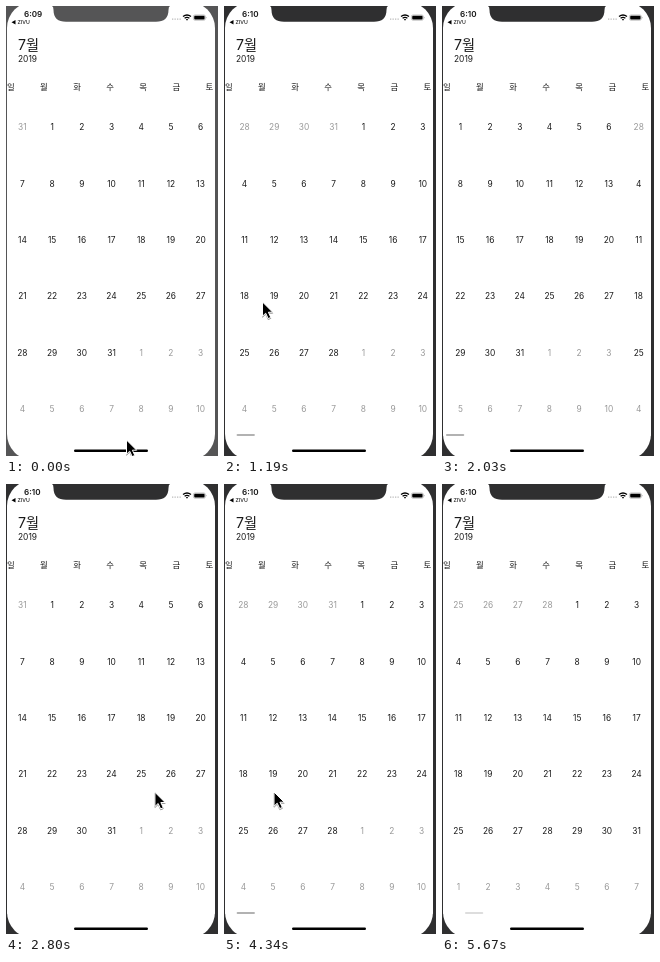
These frames come from a looping animation (212x450 px, 5740 ms). An HTML page:

```html
<!DOCTYPE html>
<html lang="ko">
<head>
<meta charset="utf-8">
<style>
html, body { margin: 0; width: 100%; height: 100%; overflow: hidden; }
svg { display: block; width: 212px; height: 450px; }
text { font-family: Inter, "Noto Sans CJK KR", "Noto Sans CJK", sans-serif; font-size: 8.4px; fill: #1a1a1a; }
.mid { text-anchor: middle; }
.dim { fill: #999; }
#arrow { filter: drop-shadow(.5px 1px .7px #0006); }
</style>
</head>
<body>
<svg viewBox="0 0 212 450">
  <defs><clipPath id="screen"><rect x="1" y="100" width="208" height="350"/></clipPath></defs>
  <rect class="bezel" width="212" height="450"/>
  <rect x="1" y="-4" width="208" height="458" rx="26" fill="#fff"/>
  <path class="bezel" d="M46 0Q47.5 .6 47.5 4C47.5 12 52 15.8 60 15.8H150C158 15.8 162.5 12 162.5 4Q162.5 .6 164 0Z"/>

  <text id="clock" x="18" y="10.6" style="font-size:8.1px" font-weight="600"></text>
  <path d="M5.5 16.2l4-2.2v4.4z"/>
  <text x="11.5" y="18.1" style="font-size:5.2px" font-weight="500">ZIVU</text>
  <path d="M166 13.2h9" stroke="#bbb" stroke-width="1.3" stroke-dasharray="1.3 1.2"/>
  <g fill="none" stroke="#000" stroke-width="1.3">
    <path d="M177 10.6q4-3.2 8 0M178.6 12.2q2.4-1.8 4.8 0"/>
    <path d="M180.2 13.6h1.6"/>
  </g>
  <rect x="187.4" y="9" width="12" height="5.2" rx="1.6" fill="none" stroke="#999" stroke-width=".6"/>
  <rect x="188.2" y="9.8" width="10.4" height="3.6" rx=".9"/>
  <path d="M200.2 10.7q1.2.9 0 1.8z" fill="#999"/>

  <text x="12" y="43.8" style="font-size:14.2px">7월</text>
  <text x="12" y="55.8">2019</text>
  <g id="week"></g>
  <g clip-path="url(#screen)"><g id="pages"></g></g>
  <rect id="bar" y="428.1" width="18.3" height="1.8" rx=".9"/>
  <rect x="68" y="443.5" width="74" height="2.4" rx="1.2"/>

  <g id="pointer">
    <circle id="press" r="19.5" fill="none" stroke="#000" stroke-width="3.3"/>
    <path id="arrow" d="M0 0V14.2L3.2 11.2 5.7 16.6 8.3 15.4 5.9 10.2H10.2Z" stroke="#fff" stroke-linejoin="round"/>
  </g>
</svg>
<script>
const LOOP = 5740, STEP = 70, PAGE = 208, FOCUS = 630;
const $ = id => document.getElementById(id);
const clamp = v => Math.min(1, Math.max(0, v));
const smooth = p => p * p * (3 - 2 * p);

function addText(parent, x, y, content, cls) {
  const el = document.createElementNS('http://www.w3.org/2000/svg', 'text');
  el.setAttribute('x', x);
  el.setAttribute('y', y);
  el.setAttribute('class', cls);
  el.textContent = content;
  parent.append(el);
}

[...'일월화수목금토'].forEach((day, i) => addText($('week'), 4.8 + i * 33.1, 84.2, day, 'mid'));

const months = [
  { before: 31, first: 1, days: 31 },
  { before: 31, first: 4, days: 28 },
  { before: 28, first: 4, days: 31 }
];
months.forEach(({ before, first, days }, page) => {
  for (let i = 0; i < 42; i++) {
    const n = i - first + 1, inside = n > 0 && n <= days;
    addText($('pages'), 16.4 + page * PAGE + i % 7 * 29.7, 124.2 + Math.floor(i / 7) * 56.4,
      n < 1 ? before + n : inside ? n : n - days, inside ? 'mid' : 'mid dim');
  }
});

// Pointer moves; those with "turn" drag the calendar by that many pages.
const home = { x: 120.5, y: 434 };
const moves = [
  { from: 0, to: 350, x: 164, y: 291 },
  { from: 420, to: 490, x: 157, y: 293 },
  { from: 560, to: 1050, x: 38.5, y: 296, turn: 1, pace: 387 },
  { from: 1470, to: 2030, x: 228, y: 307, turn: -1, pace: 436 },
  { from: 2380, to: 2520, x: 176, y: 311 },
  { from: 2680, to: 3010, x: 86, y: 302 },
  { from: 3010, to: 3220, x: 148, y: 303 },
  { from: 3290, to: 3500, x: 136, y: 301 },
  { from: 3610, to: 4150, x: 50, y: 308, turn: 1, pace: 436 },
  { from: 4480, to: 4690, x: 158, y: 280 },
  { from: 4830, to: 5110, x: 50, y: 286, turn: 1, pace: 296 },
  { from: 5180, to: 5460, x: 127, y: 443 },
  { from: 5460, to: 5530, x: 150, y: 475 }
];
const drags = moves.filter(m => m.turn);

function pointerAt(t) {
  let { x, y } = home;
  for (const m of moves) {
    const p = smooth(clamp((t - m.from) / (m.to - m.from)));
    x += (m.x - x) * p;
    y += (m.y - y) * p;
  }
  return [x, y];
}

// A page follows the finger slowly, then glides to rest.
function turned({ from, pace }, t) {
  const p = 1 - Math.exp(-((Math.max(0, t - from) / pace) ** 2.8));
  return p > .99 ? 1 : p;
}

// The scroll bar lingers after the page rests, then fades.
function barAlpha({ from, pace }, t) {
  const fadeStart = from + pace * 1.725 + 240;
  return t > from ? clamp(1 - (t - fadeStart) / 160) : 0;
}

function draw(now) {
  const t = Math.floor(now % LOOP / STEP) * STEP;
  const scroll = PAGE * drags.reduce((sum, d) => sum + d.turn * turned(d, t), 0);
  const focused = t >= FOCUS;
  document.querySelectorAll('.bezel').forEach(el => el.setAttribute('fill', focused ? '#2f2f30' : '#555556'));
  $('clock').textContent = focused ? '6:10' : '6:09';
  $('pages').setAttribute('transform', `translate(${-scroll})`);
  $('bar').setAttribute('x', 2.6 + scroll * .049);
  $('bar').setAttribute('opacity', .3 * Math.max(...drags.map(d => barAlpha(d, t))));
  $('pointer').setAttribute('transform', `translate(${pointerAt(t)})`);
  $('press').setAttribute('visibility', drags.some(d => t > d.from && t < d.to) ? 'visible' : 'hidden');
}

const start = performance.now();
function tick() {
  draw(performance.now() - start);
  requestAnimationFrame(tick);
}
tick();
</script>
</body>
</html>
```
